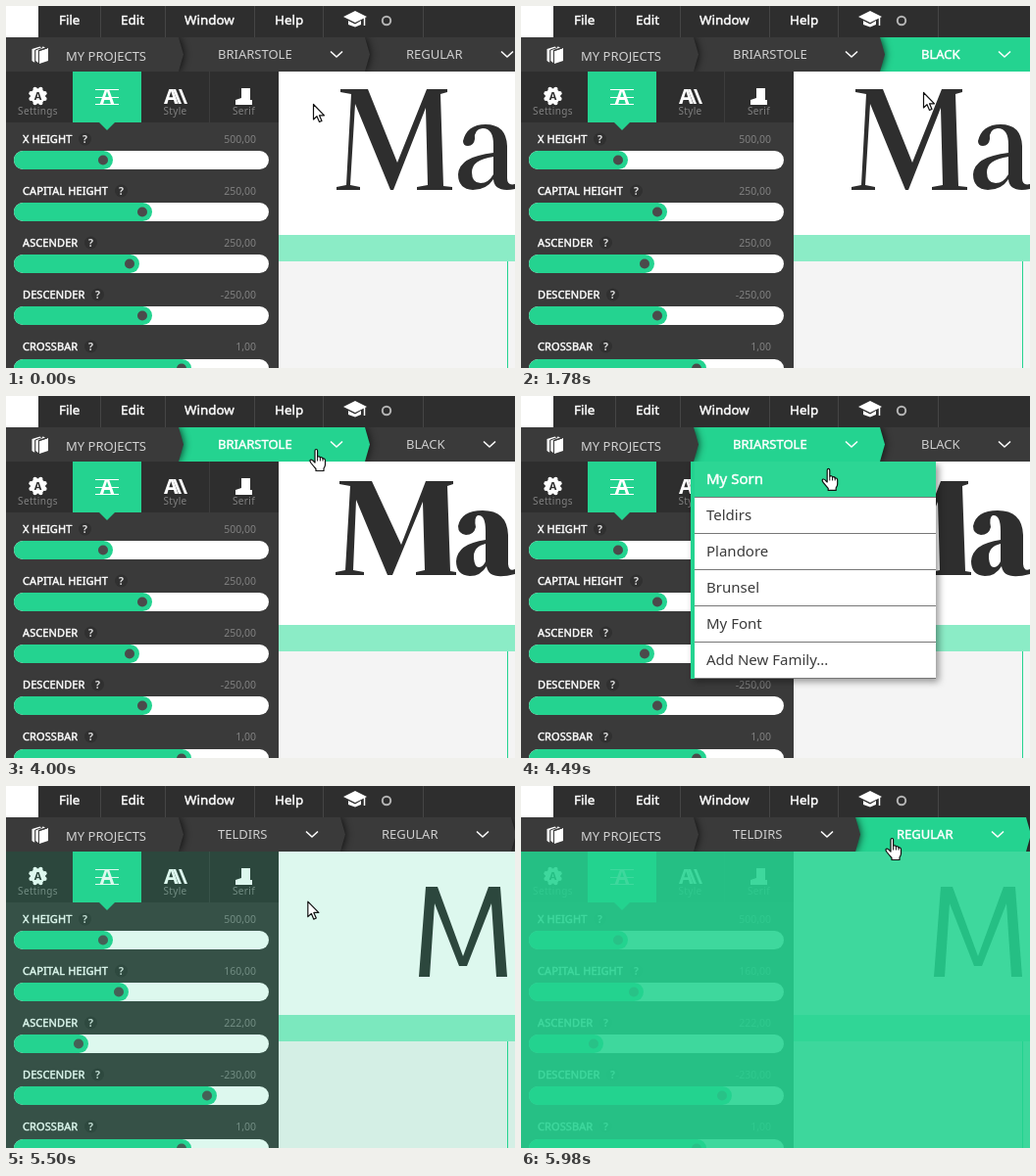
An HTML page with a canvas that plays this animation: 519x370 px, repeating every 8 s.

```html
<!DOCTYPE html>
<html lang="en">
<head>
<meta charset="utf-8">
<title>Font editor menus</title>
<style>
html, body { margin: 0; width: 100%; height: 100%; overflow: hidden; }
canvas { display: block; }
</style>
</head>
<body>
<canvas id="stage" width="519" height="370"></canvas>
<script>
const ctx = document.getElementById('stage').getContext('2d');
const LOOP = 8000;
const GREEN = '#24d390', DARK = '#2e2e2e', PANEL = '#3a3a3a', WHITE = '#fff', MUTED = '#808080';
const FAMILY = '"Noto Sans", "Open Sans", sans-serif';

const glyphs = {
  regular: new Path2D(
    'M341 85H369L399 160L429 85H450V88L443 90L446 184L455 185V188H419V185L430 183L428 104L395 188H392L356 100L351 183L361 185V188H337V185L347 183L352 90L341 88Z' +
    'M466 138Q470 121 489 121Q510 121 511 143V176Q511 184 519 182V187Q498 191 497 177Q490 188 476 188Q461 187 461 172Q462 154 497 150V142Q497 125 486 125Q477 126 478 136Q477 143 471 143Q466 143 466 138Z' +
    'M497 154Q475 157 475 170Q475 181 484 181Q492 181 497 172Z'),
  black: new Path2D(
    'M340 87H373L403 152L428 87H456V90L450 92L453 179L459 180V183H418V180L427 178L425 108L394 183H389L357 106L354 178L365 180V183H336V180L346 178L351 92L340 90Z' +
    'M461 133Q464 117 486 117Q511 117 512 142V172Q513 180 519 177V182Q492 189 490 174Q484 184 473 184Q459 183 459 169Q460 151 489 147V138Q489 121 481 122Q477 124 479 134Q477 142 469 142Q461 141 461 133Z' +
    'M489 151Q476 154 477 166Q478 176 483 175Q487 174 489 169Z'),
  sans: new Path2D('M428 103H440L466 174L492 103H504L511 195H500L495 120L470 184H462L437 120L432 195H421Z')
};
const hand = new Path2D('M6 2Q6 .5 7.3 .5T8.6 2V8.5Q9 7.6 10.2 7.8Q11.3 8 11.4 9Q12 8.4 13 8.7Q14 9 14 10Q15 9.6 15.8 10.2Q16.5 10.7 16.5 12V16Q16.5 18 15 20V22.5H7V20.5Q4 17 2 14.5Q.2 12 1.5 11.2Q2.8 10.6 4.5 12.5L6 14Z');
const arrow = new Path2D('M.5 .5V16L4 12.7L6.5 18.5L9 17.4L6.5 11.8H11.5Z');

// Keyframes: [time, ...values]
const cursorKeys = [
  [170, 313, 100], [410, 438, 51], [1010, 438, 51], [1400, 410, 88], [2270, 410, 88],
  [2540, 340, 64], [2720, 316, 54], [4360, 316, 54], [4780, 307, 118],
  [5500, 307, 118], [5670, 362, 58], [5900, 378, 53]
];
const familyKeys = [[2525, 0], [2700, 1], [5000, 1], [5190, 0], [5560, 0], [5620, .6], [5670, .43], [5800, 0]];
const variantKeys = [[310, 0], [410, 1], [1790, 1], [1910, 0], [5700, 0], [5900, 1]];
const overlayKeys = [[5480, 0], [5600, .88]];

function at(keys, t) {
  const i = keys.findIndex(k => k[0] > t);
  if (i === 0) return keys[0].slice(1);
  if (i < 0) return keys[keys.length - 1].slice(1);
  const a = keys[i - 1], b = keys[i], p = (t - a[0]) / (b[0] - a[0]);
  return a.slice(1).map((v, j) => v + (b[j + 1] - v) * p);
}

function rect(x, y, w, h, color) {
  ctx.fillStyle = color;
  ctx.fillRect(x, y, w, h);
}
function shape(points, color) {
  ctx.beginPath();
  points.forEach(([x, y]) => ctx.lineTo(x, y));
  ctx.closePath();
  ctx.fillStyle = color;
  ctx.fill();
}
function line(points, color, width) {
  ctx.beginPath();
  points.forEach(([x, y]) => ctx.lineTo(x, y));
  ctx.strokeStyle = color;
  ctx.lineWidth = width;
  ctx.stroke();
}
function disc(x, y, r, color) {
  ctx.beginPath();
  ctx.arc(x, y, r, 0, Math.PI * 2);
  ctx.fillStyle = color;
  ctx.fill();
}
function pill(x, y, w, h, color) {
  ctx.beginPath();
  ctx.roundRect(x, y, w, h, h / 2);
  ctx.fillStyle = color;
  ctx.fill();
}
function text(str, x, y, size, color, { weight = 400, align = 'left', spacing = 0 } = {}) {
  const medium = weight === 500;
  ctx.font = `${medium ? 400 : weight} ${size}px ${FAMILY}`;
  ctx.letterSpacing = spacing + 'px';
  ctx.textAlign = align;
  ctx.fillStyle = color;
  ctx.fillText(str, x, y);
  if (!medium) return;
  // A hairline outline gives a weight between regular and bold.
  ctx.lineJoin = 'round';
  ctx.lineWidth = .45;
  ctx.strokeStyle = color;
  ctx.strokeText(str, x, y);
}
function mix(level) {
  const c = [36, 211, 144].map(v => Math.round(58 + (v - 58) * level));
  return `rgb(${c})`;
}

function drawMenuBar() {
  rect(0, 0, 519, 32, DARK);
  rect(0, 0, 33, 32, WHITE);
  for (const x of [96, 162, 253, 323, 425]) rect(x, 0, 1, 32, '#454545');
  [['File', 54], ['Edit', 117], ['Window', 182], ['Help', 274]]
    .forEach(([s, x]) => text(s, x, 19, 13.4, WHITE, { weight: 500 }));
  shape([[344, 11], [356, 5], [368, 11], [356, 17]], WHITE);
  shape([[349, 15], [356, 18.5], [362, 15], [362, 19], [356, 21.5], [349, 19]], WHITE);
  line([[365.5, 12], [365.5, 20]], WHITE, 1.5);
  ctx.beginPath();
  ctx.arc(388, 15, 4.2, 0, Math.PI * 2);
  ctx.strokeStyle = '#b5b5b5';
  ctx.lineWidth = 2;
  ctx.stroke();
}

function crumb(left, edge, color) {
  ctx.save();
  ctx.shadowColor = 'rgba(0,0,0,.85)';
  ctx.shadowBlur = 9;
  shape([[left, 32], [edge, 32], [edge + 5, 49.5], [edge, 67], [left, 67]], color);
  ctx.restore();
}
function crumbLabel(label, x, chevron, level) {
  text(label, x, 54, 13, level > 0 ? WHITE : '#cfcfcf', { weight: level > 0 ? 500 : 400 });
  line([[chevron - 6, 46.5], [chevron, 52], [chevron + 6, 46.5]], WHITE, 1.6);
}

function drawBooks() {
  for (const x of [26.5, 30]) {
    shape([[x, 44], [x + 8, 41.5], [x + 10, 42.5], [x + 3, 45], [x + 3, 58], [x, 56]], WHITE);
  }
  shape([[34, 46], [43, 43], [43, 56], [34, 59]], WHITE);
  line([[29.8, 58], [29.8, 45], [37, 42.5]], PANEL, 1);
  line([[33.5, 59], [33.5, 45.8], [42, 43]], PANEL, 1);
}

function drawCrumbs(s) {
  const edge = s.familyChevron + 29, labelX = edge + 42;
  ctx.save();
  ctx.beginPath();
  ctx.rect(0, 32, 519, 35);
  ctx.clip();
  rect(0, 32, 519, 35, PANEL);
  crumb(edge - 10, s.variantChevron + 29, mix(s.variantLevel));
  crumb(166, edge, mix(s.familyLevel));
  crumb(-10, 176, PANEL);
  ctx.restore();
  drawBooks();
  text('MY PROJECTS', 61, 56, 13, '#d2d2d2');
  crumbLabel(s.family, 216, s.familyChevron, s.familyLevel);
  crumbLabel(s.variant, labelX, s.variantChevron, s.variantLevel);
}

function drawTabs() {
  rect(0, 67, 278, 52, DARK);
  rect(207, 67, 1, 52, '#3c3c3c');
  rect(68, 67, 70, 52, GREEN);
  shape([[95, 119], [111, 119], [103, 127]], GREEN);
  disc(32.5, 92, 7.8, WHITE);
  for (let i = 0; i < 8; i++) {
    const a = i * Math.PI / 4 + Math.PI / 8;
    disc(32.5 + 7.5 * Math.cos(a), 92 + 7.5 * Math.sin(a), 2.2, WHITE);
  }
  text('A', 32.5, 96, 11, DARK, { weight: 700, align: 'center' });
  text('A', 103, 100, 21, WHITE, { weight: 700, align: 'center' });
  for (const y of [85.5, 93.5, 100.5]) line([[91, y], [115, y]], WHITE, 1);
  text('A', 161, 100, 21, WHITE, { weight: 700 });
  for (const x of [170, 176]) shape([[x, 85], [x + 3, 85], [x + 9, 100], [x + 6, 100]], WHITE);
  shape([[240, 84], [249, 84], [249, 96], [251, 96], [251, 101], [234, 101], [234, 96], [240, 94]], WHITE);
  [['Settings', 32.5], ['Style', 172.5], ['Serif', 242.5]]
    .forEach(([s, x]) => text(s, x, 111, 10, MUTED, { align: 'center', spacing: .35 }));
}

function drawSliders(loaded) {
  rect(0, 67, 278, 303, PANEL);
  const rows = [
    ['X HEIGHT', 80.5, '500,00', 109],
    ['CAPITAL HEIGHT', 117.5, ...(loaded ? ['160,00', 125] : ['250,00', 149])],
    ['ASCENDER', 86.5, ...(loaded ? ['222,00', 84] : ['250,00', 136])],
    ['DESCENDER', 93.5, ...(loaded ? ['-230,00', 215] : ['-250,00', 149])],
    ['CROSSBAR', 86.5, '1,00', 189]
  ];
  rows.forEach(([label, helpX, value, end], i) => {
    const y = 136 + i * 53, top = Math.floor(148 + i * 53.25);
    text(label, 17, y + 4, 11, WHITE, { weight: 500, spacing: .1 });
    disc(helpX, y, 6.5, '#303030');
    text('?', helpX, y + 4, 10.5, '#dcdcdc', { weight: 700, align: 'center' });
    text(value, 255, y + 4, 10.5, MUTED, { align: 'right' });
    pill(8, top, 260, 19, WHITE);
    pill(8, top, end - 8, 19, GREEN);
    disc(end - 10, top + 9.5, 5, '#4b4b4b');
  });
}

function drawPreview(glyph) {
  rect(278, 67, 241, 167, WHITE);
  rect(278, 234, 241, 27, '#8becc6');
  rect(278, 261, 241, 109, '#f4f4f4');
  rect(511, 261, 1, 109, GREEN);
  ctx.fillStyle = DARK;
  ctx.fill(glyphs[glyph], 'evenodd');
}

function drawMenu(x, width, items, hovered) {
  const height = items.length * 37;
  ctx.save();
  ctx.shadowColor = 'rgba(0,0,0,.4)';
  ctx.shadowBlur = 7;
  ctx.shadowOffsetX = ctx.shadowOffsetY = 3;
  rect(x, 67, width, height, WHITE);
  ctx.restore();
  items.forEach((item, i) => {
    const y = 67 + i * 37, on = i === hovered;
    if (on) rect(x, y, width, 36, '#2cd694');
    rect(x, y + 36, width, 1, '#777');
    text(item, x + 16, y + 23, 15, on ? WHITE : '#3b3b3b', { weight: on ? 500 : 400 });
  });
  rect(x, 67, 4, height, GREEN);
}

function drawCursor(x, y, pointing) {
  ctx.save();
  ctx.translate(pointing ? x - 7 : x, y);
  ctx.lineJoin = 'round';
  ctx.lineWidth = 1.2;
  ctx.fillStyle = WHITE;
  ctx.strokeStyle = '#111';
  const path = pointing ? hand : arrow;
  ctx.fill(path);
  ctx.stroke(path);
  if (pointing) for (const fx of [8.6, 11.4, 14]) line([[fx, 9], [fx, 12.5]], '#111', 1);
  ctx.restore();
}

function draw(t) {
  const [x, y] = at(cursorKeys, t);
  const switched = t >= 5100, loaded = t >= 5500;
  const variantOpen = t >= 740 && t < 1740, familyOpen = t >= 4070 && t < 5100;
  const hovered = y < 67 ? -1 : Math.floor((y - 67) / 37);
  const isBlack = t >= 1740 && !switched;
  const state = {
    family: switched ? 'TELDIRS' : 'BRIARSTOLE',
    variant: isBlack ? 'BLACK' : 'REGULAR',
    familyChevron: switched ? 312 : 337,
    variantChevron: switched ? 486 : isBlack ? 493 : 511,
    familyLevel: at(familyKeys, t)[0],
    variantLevel: at(variantKeys, t)[0]
  };

  drawPreview(loaded ? 'sans' : t >= 2270 ? 'black' : 'regular');
  drawSliders(loaded);
  drawTabs();
  ctx.globalAlpha = at(overlayKeys, t)[0];
  rect(0, 67, 519, 303, GREEN);
  ctx.globalAlpha = 1;
  if (variantOpen) drawMenu(365, 170, ['Black', 'Thin', 'Add New Variant...'], hovered);
  if (familyOpen) drawMenu(173, 250, ['My Sorn', 'Teldirs', 'Plandore', 'Brunsel', 'My Font', 'Add New Family...'], hovered);
  drawCrumbs(state);
  drawMenuBar();
  drawCursor(x, y, variantOpen || familyOpen || y < 67);
}

function tick(now) {
  draw(now % LOOP);
  requestAnimationFrame(tick);
}
draw(0);
requestAnimationFrame(tick);
</script>
</body>
</html>
```
